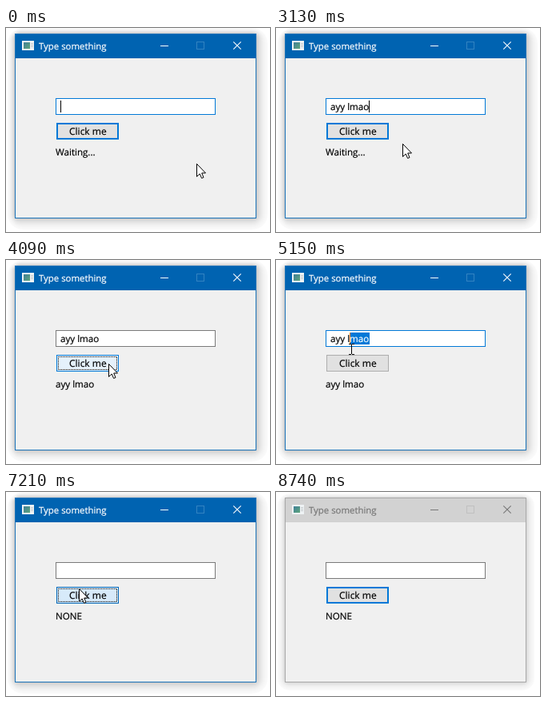
An HTML page that plays this animation: 330x256 px, repeating every 8870 ms.

```html
<!DOCTYPE html>
<html lang="en">
<head>
<meta charset="utf-8">
<title>Type something</title>
<style>
  html, body { margin: 0; width: 100%; height: 100%; overflow: hidden; background: #fff; }
  svg { display: block; width: 330px; height: 256px; }
  text { font: 11.6px "Open Sans", "Noto Sans", sans-serif; white-space: pre; text-rendering: geometricPrecision; stroke: currentColor; stroke-width: .2; fill: currentColor; }
  .crisp { shape-rendering: crispEdges; }
</style>
</head>
<body>
<svg viewBox="0 0 330 256">
  <defs>
    <clipPath id="selClip"><rect id="selClipRect" y="91" height="15"/></clipPath>
    <linearGradient id="teal" x2="1" y2="1">
      <stop stop-color="#3f7f98"/><stop offset="1" stop-color="#5fa67c"/>
    </linearGradient>
  </defs>
  <g id="shadow"></g>

  <g class="crisp">
    <rect id="frame" x="11" y="7" width="302" height="232"/>
    <rect id="bar" x="12" y="8" width="300" height="30"/>
    <rect x="12" y="38" width="300" height="200" fill="#f0f0f0"/>
    <rect x="20" y="16" width="15" height="12" fill="#eef2f4"/>
    <rect x="22" y="18" width="8" height="8" fill="url(#teal)"/>
    <path d="M31 19.5h3M31 21.5h3M31 23.5h3" stroke="#c4cacd"/>
  </g>
  <text id="title" x="41" y="27" style="font-size:11.4px">Type something</text>
  <path id="minBtn" class="crisp" d="M193 22.5h10"/>
  <rect id="maxBtn" class="crisp" x="238.5" y="17.5" width="9" height="9" fill="none"/>
  <path id="closeBtn" d="M284.3 17.3l9.4 9.4M293.7 17.3l-9.4 9.4" stroke-width="1.1"/>

  <rect id="field" class="crisp" x="62.5" y="88.5" width="199" height="20" fill="#fff"/>
  <text id="typed" x="68" y="103"></text>
  <g id="selection">
    <rect id="selRect" class="crisp" y="91" height="15" fill="#0078d7"/>
    <text id="selText" x="68" y="103" color="#fff" clip-path="url(#selClip)"></text>
  </g>
  <rect id="caret" class="crisp" y="91" width="1" height="15"/>

  <rect id="btnEdge" class="crisp" x="63" y="119" width="78" height="21"/>
  <rect id="btnFill" class="crisp"/>
  <path id="focusRing" class="crisp" d="M65 121.5H139M65 137.5H139M65.5 121V138M138.5 122V138" fill="none" stroke="#000" stroke-dasharray="1 1"/>
  <text x="79" y="134" style="font-size:12px">Click me</text>
  <text id="label" x="62" y="160"></text>

  <path id="arrow" d="M.5.5V16.5L4.2 13 6.6 18.5 9 17.5 6.7 12H11.5Z" fill="#fff" stroke="#000" stroke-linejoin="round"/>
  <path id="ibeam" class="crisp" d="M-3 -6.5H0M1 -6.5H4M-3 6.5H0M1 6.5H4M.5 -6V6" fill="none" stroke="#000"/>
</svg>

<script>
const LOOP = 8870, STEP = 120, BLINK = 530;
const PRESS = 3820, REFOCUS = 4760, CLEAR = 5950, PRESS_AGAIN = 7090, LEAVE = 8180, BLUR = 8740;
const phrase = "ayy lmao", textX = 68;

const $ = id => document.getElementById(id);
const set = (id, attrs) => {
  for (const k in attrs) $(id).setAttribute(k, attrs[k]);
};
const show = (id, on) => set(id, { visibility: on ? "visible" : "hidden" });
const within = (t, a, b) => t >= a && t < b;

// Pointer moves, each made of equal held steps
const origin = { x: 238, y: 170 };
const moves = [
  { at: 120, steps: 4, x: 229, y: 163 },
  { at: 2650, steps: 5, x: 158, y: 145 },
  { at: 3280, steps: 4, x: 128, y: 130 },
  { at: 4370, steps: 4, x: 116, y: 101 },
  { at: REFOCUS, steps: 4, x: 94, y: 112 },
  { at: 5270, steps: 4, x: 44, y: 111 },
  { at: 6350, steps: 6, x: 91, y: 121 },
  { at: 7470, steps: 5, x: 278, y: 239 }
];

function pointer(t) {
  let { x, y } = origin;
  for (const m of moves) {
    if (t < m.at) break;
    const k = Math.min(1, (Math.floor((t - m.at) / STEP) + 1) / m.steps);
    x += (m.x - x) * k;
    y += (m.y - y) * k;
  }
  return [Math.round(x), Math.round(y)];
}

// One key every two beats, with one quick pair in the second word
function typedCount(t) {
  if (t >= CLEAR) return 0;
  const beat = Math.floor((t - 760) / 134);
  return beat < 0 ? 0 : Math.min(phrase.length, (beat >> 1) + 1 + (beat >= 9));
}

function drawShadow(active) {
  const size = active ? 14 : 10;
  let out = "";
  for (let d = size; d > 0; d--) {
    const left = 11 - d * 9 / size, top = 7 - d / 2;
    const alpha = d === size ? .025 : .005 + .03 * (1 - d / size) ** 2;
    out += `<rect x="${left}" y="${top}" width="${313 + d - left}" height="${239 + d - top}" rx="${d + 5}" fill-opacity="${alpha}"/>`;
  }
  $("shadow").innerHTML = out;
}

let wasActive = null;
function drawWindow(active) {
  if (active === wasActive) return;
  wasActive = active;
  drawShadow(active);
  const ink = active ? "#fff" : "#777";
  set("frame", { fill: active ? "#1a73b9" : "#a8a8a8" });
  set("bar", { fill: active ? "#0063b1" : "#d2d2d2" });
  set("title", { color: ink });
  set("minBtn", { stroke: ink });
  set("closeBtn", { stroke: ink });
  set("maxBtn", { stroke: active ? "#3383c1" : "#c0c0c0" });
}

$("selText").textContent = phrase;
const stops = [textX];
for (let i = 1; i <= phrase.length; i++) {
  stops.push(textX + Math.round($("selText").getSubStringLength(0, i)));
}
const textEnd = stops[phrase.length];
const nearestStop = x => stops.reduce((a, b) => Math.abs(b - x) < Math.abs(a - x) ? b : a);

function drawField(t, mx) {
  const focused = t < PRESS || within(t, REFOCUS, PRESS_AGAIN);
  const dragging = within(t, REFOCUS, CLEAR);
  const count = typedCount(t);
  set("field", { stroke: focused ? "#0078d7" : "#7a7a7a" });
  $("typed").textContent = phrase.slice(0, count);

  const caretX = dragging ? nearestStop(mx) : stops[count];
  const selected = dragging && caretX < textEnd;
  const sel = { x: caretX, width: selected ? textEnd + 1 - caretX : 0 };
  set("selRect", sel);
  set("selClipRect", sel);
  show("selection", selected);

  const typing = within(t, 760, 2650);
  const lit = Math.floor((t + 100) / BLINK) % 2 === 0;
  set("caret", { x: caretX, fill: selected ? "#ff8728" : "#000" });
  show("caret", focused && (lit || typing || dragging));
}

function drawButton(t, mx, my, active) {
  const hover = t < LEAVE && within(mx, 63, 141) && within(my, 119, 140);
  const sincePress = t - (t < PRESS_AGAIN ? PRESS : PRESS_AGAIN);
  let edge = "#0078d7", fill = "#e1e1e1", w = 2;
  if (within(sincePress, 0, STEP)) [edge, fill, w] = ["#005499", "#cce4f7", 1];
  else if (within(sincePress, STEP, 2 * STEP)) [edge, fill, w] = ["#0066b7", "#d7eafa", 1];
  else if (hover) [fill, w] = ["#e5f1fb", 1];
  else if (within(t, REFOCUS, PRESS_AGAIN)) [edge, w] = ["#adadad", 1];
  set("btnEdge", { fill: edge });
  set("btnFill", { x: 63 + w, y: 119 + w, width: 78 - 2 * w, height: 21 - 2 * w, fill });
  show("focusRing", active && (within(t, PRESS, REFOCUS) || t >= PRESS_AGAIN));
}

function draw(t) {
  const [mx, my] = pointer(t);
  const active = t < BLUR;
  drawWindow(active);
  drawField(t, mx);
  drawButton(t, mx, my, active);
  $("label").textContent = t < PRESS + STEP ? "Waiting..." : t < PRESS_AGAIN + STEP ? phrase : "NONE";

  const beam = within(t, 4600, 5670);
  const place = { transform: `translate(${mx} ${my})` };
  set("arrow", place);
  set("ibeam", place);
  show("arrow", !beam && t < LEAVE);
  show("ibeam", beam);
}

const start = performance.now();
function tick() {
  draw((performance.now() - start) % LOOP);
  requestAnimationFrame(tick);
}
tick();
</script>
</body>
</html>
```
